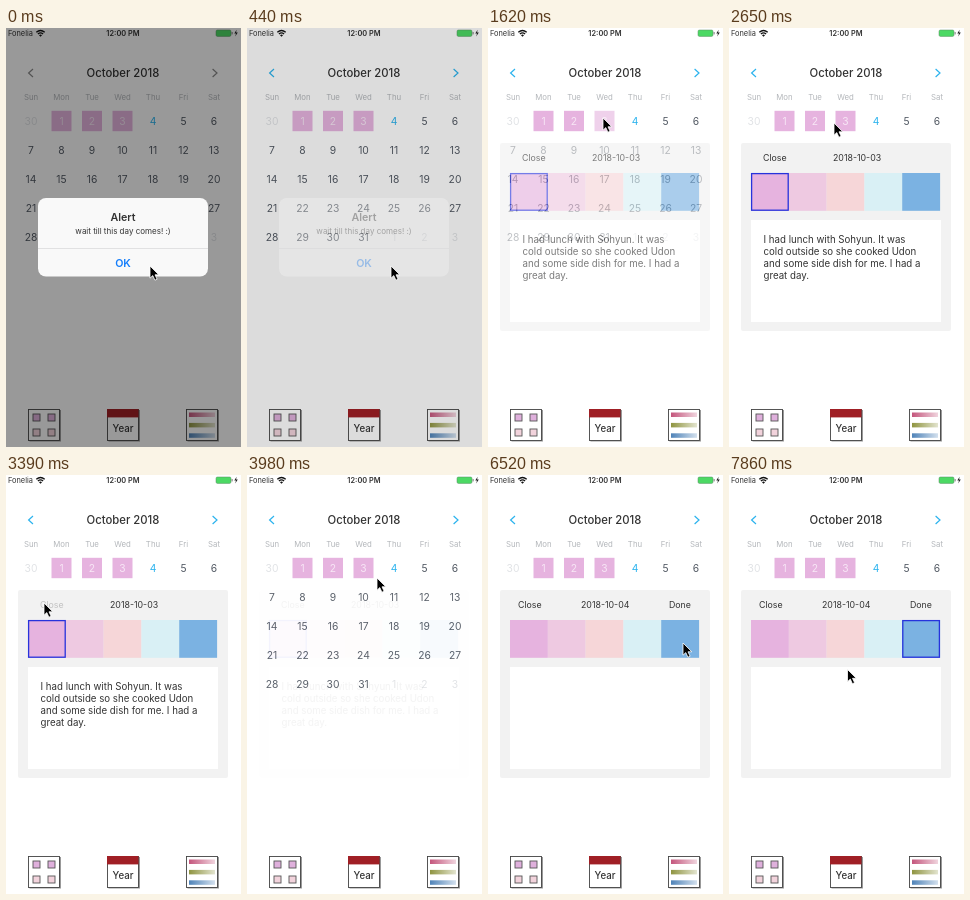
An HTML page that plays this animation: 235 px wide and 419 px high, repeating every 8000 ms.

```html
<!DOCTYPE html>
<html lang="en">
<head>
<meta charset="utf-8">
<style>
  html, body { margin: 0; width: 100%; height: 100%; overflow: hidden; background: #fff; }
  svg { display: block; width: 100vw; height: 100vh; }
  text { font-family: Inter, Roboto, sans-serif; fill: #333; }
</style>
</head>
<body>
<svg id="stage" viewBox="0 0 235 419"></svg>
<script>
const LOOP = 8000, STEP = 148, LEAD = 22;
const BLUE = '#2bb3ee', PINK = '#e6b3df';
const SWATCHES = [PINK, '#eec9e1', '#f6d6d8', '#d9f0f5', '#7bb2e2'];
const SWATCH_W = 37.8;

const text = (x, y, size, str, attrs = '') =>
  `<text x="${x}" y="${y}" font-size="${size}" ${attrs}>${str}</text>`;
const mid = (x, y, size, str, attrs = '') =>
  text(x, y, size, str, 'text-anchor="middle" ' + attrs);
const rect = (x, y, w, h, fill, attrs = '') =>
  `<rect x="${x}" y="${y}" width="${w}" height="${h}" fill="${fill}" ${attrs}/>`;
const colX = i => 25 + 30.5 * i;

function statusBar() {
  return text(2, 7.8, 7.4, 'Fonelia') +
    `<g fill="none" stroke="#111" stroke-width="1.3">
      <path d="M30.3 4.3Q34.5 .6 38.7 4.3M31.9 6Q34.5 3.7 37.1 6"/></g>
     <path d="M33 7.2Q34.5 5.9 36 7.2L34.5 8.8Z" fill="#111"/>` +
    mid(117, 7.8, 7.4, '12:00 PM', 'font-weight="600"') +
    rect(210, 2, 15, 6.4, '#4cd964', 'rx="1.4" stroke="#5a8a62" stroke-width=".5"') +
    rect(225.6, 4, 1, 2.4, '#777') +
    '<path d="M230.6 1.8L228.3 5.6H230L229.2 8.6L231.8 4.6H230.1Z" fill="#222"/>';
}

function calendar() {
  let out = mid(117, 49, 11.3, 'October 2018', 'font-weight="500"') +
    `<path id="arrows" d="M27 41L22.6 45L27 49M206.6 41L211 45L206.6 49" fill="none" stroke-width="1.2"/>`;
  ['Sun', 'Mon', 'Tue', 'Wed', 'Thu', 'Fri', 'Sat'].forEach((d, i) =>
    out += mid(colX(i), 72, 7.8, d, 'style="fill:#b4b7bb"'));
  for (let i = 0; i < 35; i++) {
    const x = colX(i % 7), y = 93 + 29 * Math.floor(i / 7);
    const day = i === 0 ? 30 : i > 31 ? i - 31 : i;
    const marked = i > 0 && i < 4;
    const color = i === 0 || i > 31 ? '#e1e3e6' : marked ? '#f7e6f5' : i === 4 ? BLUE : '#545b65';
    out += `<g id="day${i}">` + (marked ? rect(x - 10, y - 10.2, 20, 20.4, PINK) : '') +
      mid(x, y + 3.7, 10.3, day, `style="fill:${color}"`) + '</g>';
  }
  return out;
}

function toolbar() {
  const frame = x => rect(x + 1, 382, 31.5, 31.5, '#999') +
    rect(x, 381.5, 31, 31, '#fff', 'stroke="#444" stroke-width=".9"');
  let out = [22.5, 101.5, 180.5].map(frame).join('');
  [0, 1, 2, 3].forEach(i => out += rect(27 + 15 * (i % 2), 386 + 15 * (i >> 1), 7, 7,
    i < 2 ? '#dfb0dc' : '#f2d3dc', 'stroke="#555" stroke-width=".9"'));
  out += rect(101, 381, 31.5, 8.4, '#a01f25') + mid(117, 404.3, 9.7, 'Year', 'font-weight="500"');
  ['#c4567c', '#8f9440', '#4f83b8'].forEach((c, i) => {
    out += `<linearGradient id="bar${i}"><stop stop-color="${c}"/>
      <stop offset="1" stop-color="${c}" stop-opacity=".25"/></linearGradient>` +
      rect(183, 384.5 + 10.4 * i, 26, 4.5, `url(#bar${i})`);
  });
  return out;
}

function panel() {
  return rect(12, 115, 210, 188, '#f2f2f2', 'rx="2"') +
    text(30, 133.2, 8.8, 'Close', 'id="close"') +
    text(93, 133.2, 8.8, '', 'id="date"') +
    text(181, 133.2, 8.8, 'Done', 'id="done"') +
    SWATCHES.map((c, i) => rect(22 + SWATCH_W * i, 145, SWATCH_W + .1, 37.8, c)).join('') +
    rect(0, 145.6, SWATCH_W - 1.2, 36.6, 'none', 'id="pick" stroke="#2733dc" stroke-width="1.3"') +
    rect(22, 192, 190, 102, '#fff') + '<g id="note">' +
    ['I had lunch with Sohyun. It was', 'cold outside so she cooked Udon',
      'and some side dish for me. I had a', 'great day.']
      .map((line, i) => text(34.5, 214.6 + 12 * i, 9.7, line)).join('') + '</g>';
}

function alertBox() {
  return rect(32, 170, 170, 78.5, '#f9f9f9', 'rx="8"') +
    mid(117, 192.8, 10.7, 'Alert', 'font-weight="600"') +
    mid(117, 205.6, 8, 'wait till this day comes! :)') +
    rect(32, 220, 170, .6, '#d2d2d4') +
    mid(117, 238.6, 10.7, 'OK', 'font-weight="600" style="fill:#157efb"');
}

const group = (id, body) => `<g id="${id}">${body}</g>`;
const $ = id => document.getElementById(id);
$('stage').innerHTML = statusBar() + calendar() + toolbar() + group('panel', panel()) +
  rect(0, 0, 235, 419, '#000', 'id="dim"') + group('alert', alertBox()) +
  group('cursor', '<path d="M0 0V12.2L2.8 9.6L4.9 14.2L7.1 13.2L5 8.8H8.8Z" fill="#000" stroke="#fff" stroke-width=".8"/>');

// Tracks: [step, values...], linear in between.
const alertTrack = [[1, 1], [2, .85], [3, .34], [4, .08], [5, 0]];
const panelTrack = [[10, 0], [11, .64], [12, .92], [13, 1], [23, 1], [24, .93], [25, .6],
  [26, .24], [27, .05], [28, 0], [31, 0], [32, .64], [33, 1]];
const cursorTrack = [[4, 144, 238], [5, 138, 205], [6, 126, 150], [7, 118, 105], [8, 115, 90],
  [17, 115, 90], [18, 105, 95], [20, 48, 123], [21, 38, 128], [24, 38, 128], [25, 52, 124],
  [27, 130, 103], [28, 142, 95], [29, 145, 93], [35, 145, 93], [36, 188, 187], [40, 193, 188],
  [41, 193, 188], [42, 195, 184], [44, 195, 168], [45, 195, 168], [46, 155, 167],
  [47, 155, 167], [48, 174, 167], [49, 185, 167], [52, 185, 167], [53, 118.5, 194.5]];

function at(track, k) {
  const i = track.findIndex(p => p[0] >= k);
  if (i === 0) return track[0].slice(1);
  if (i < 0) return track[track.length - 1].slice(1);
  const a = track[i - 1], b = track[i], f = (k - a[0]) / (b[0] - a[0]);
  return a.slice(1).map((v, j) => v + (b[j + 1] - v) * f);
}

const set = (id, name, value) => $(id).setAttribute(name, value);

function draw(now) {
  const k = Math.floor((now % LOOP + LEAD) / STEP);
  const [shown] = at(alertTrack, k), [x, y] = at(cursorTrack, k);
  const first = k < 30;
  const picked = first ? 0 : k >= 51 ? 4 : k >= 46 ? 3 : -1;

  set('alert', 'opacity', shown);
  set('dim', 'opacity', .4 * shown);
  set('arrows', 'stroke', k < 2 ? '#8a8a8a' : BLUE);
  set('panel', 'opacity', at(panelTrack, k)[0]);
  set('cursor', 'transform', `translate(${x} ${y})`);
  set('day3', 'opacity', k === 10 || k === 11 ? .6 : 1);
  set('day4', 'opacity', k === 31 ? .4 : 1);

  set('close', 'x', first ? 34 : 30);
  set('close', 'opacity', k === 23 ? .25 : 1);
  set('date', 'x', first ? 104 : 93);
  $('date').textContent = first ? '2018-10-03' : '2018-10-04';
  set('done', 'opacity', first ? 0 : 1);
  set('note', 'opacity', first ? 1 : 0);
  set('pick', 'opacity', picked < 0 ? 0 : 1);
  set('pick', 'x', 22.6 + SWATCH_W * Math.max(picked, 0));
  requestAnimationFrame(tick);
}

const start = performance.now();
const tick = () => draw(performance.now() - start);
tick();
</script>
</body>
</html>
```
